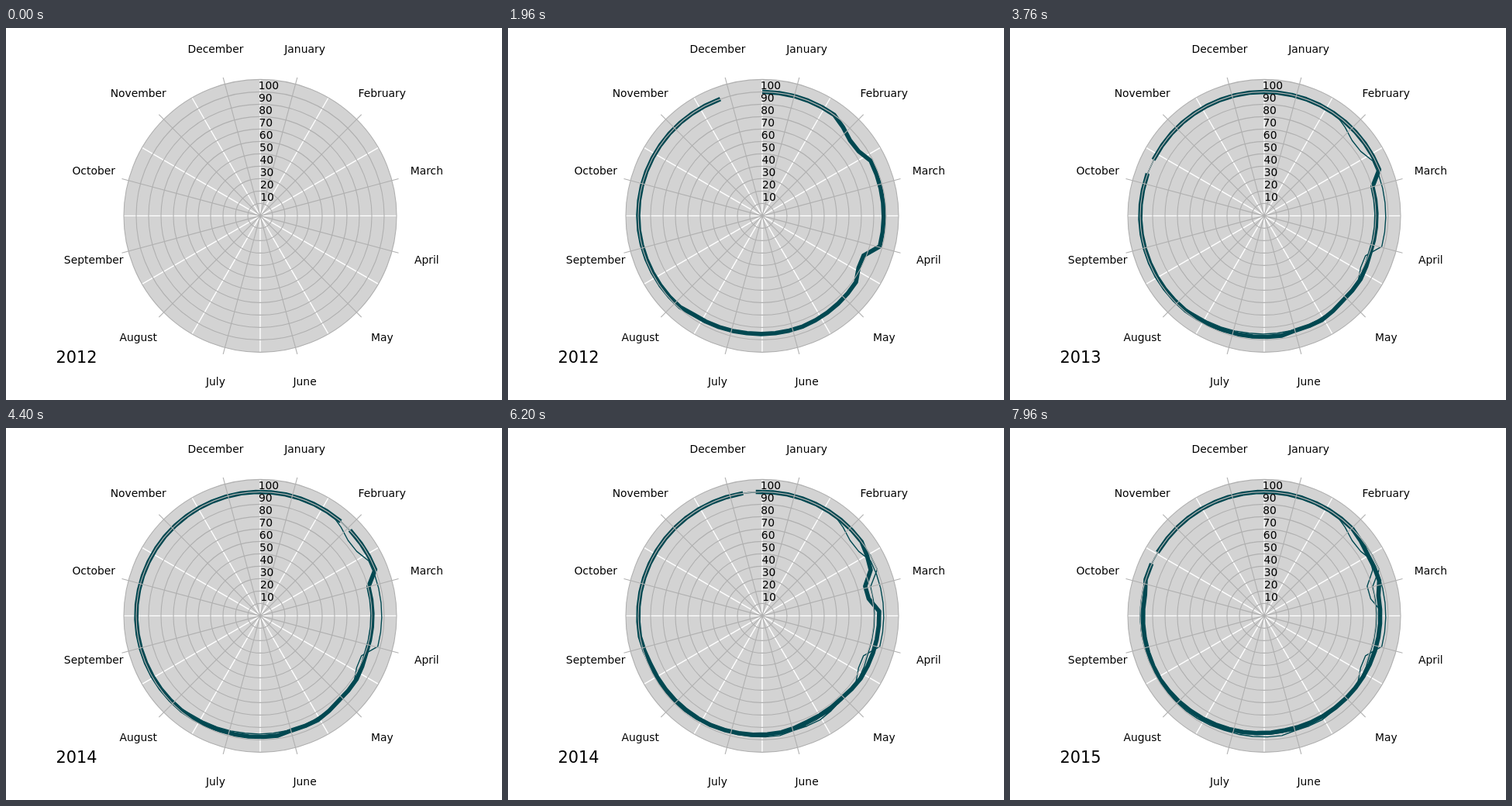
Recreate the animation shown at these times as an HTML page with a canvas. Size 640 px wide and 480 px high, loop 8 s.

```html
<!DOCTYPE html>
<html lang="en">
<head>
<meta charset="utf-8">
<title>Weekly values by year</title>
<style>
  html, body { margin: 0; width: 100%; height: 100%; overflow: hidden; background: #fff; }
  canvas { display: block; }
</style>
</head>
<body>
<canvas id="stage" width="640" height="480"></canvas>
<script>
const ctx = document.getElementById('stage').getContext('2d');
const CX = 328, CY = 242.4, UNIT = 1.6, POINT = 100 / 72;
const WEEKS = 200, STEP = 40, WINDOW = 51;
const GRID = '#b0b0b0', INK = '#004851';
const MONTHS = ['January', 'February', 'March', 'April', 'May', 'June', 'July',
  'August', 'September', 'October', 'November', 'December'];

// Turning points [week, value]; the value runs straight between them.
const turns = [
  [0, 100], [5, 100], [7, 93.4], [8, 93.6], [9, 98.1], [15, 98], [16, 87.8], [17, 88.3],
  [18, 92.6], [23, 95], [27, 95.4], [31, 97], [32, 99], [38, 100],
  [62, 100], [63, 90.5], [68, 90.6], [70, 93], [72, 93.2], [74, 96], [76, 95.8],
  [77, 97.6], [81, 97.8], [84, 99.2], [91, 100],
  [112, 100], [114, 95], [115, 86.4], [116, 87], [117, 94.4], [122, 94.1], [124, 92.3],
  [127, 92.8], [129, 95.2], [134, 97.4], [140, 98.1], [142, 100],
  [163, 100], [165, 97], [167, 97], [168, 93.6], [181, 93.8], [191, 98.3], [197, 97.6],
  [198, 100], [WEEKS, 100]
];

function valueAt(week) {
  const next = turns.findIndex(([w]) => w > week);
  const [w0, v0] = turns[next - 1], [w1, v1] = turns[next];
  return v0 + (v1 - v0) * (week - w0) / (w1 - w0);
}

// Clockwise angle in degrees from the top.
function polar(degrees, value) {
  const a = degrees * Math.PI / 180, r = value * UNIT;
  return [CX + r * Math.sin(a), CY - r * Math.cos(a)];
}

const dateOf = week => Date.UTC(2012, 0, 1 + 7 * week);
const yearOf = week => new Date(dateOf(week)).getUTCFullYear();

const points = Array.from({ length: WEEKS }, (_, week) => {
  const dayOfYear = (dateOf(week) - Date.UTC(yearOf(week), 0, 0)) / 864e5;
  return polar(dayOfYear / 365 * 360, valueAt(week));
});

function strokePath(path, color, width) {
  ctx.beginPath();
  path.forEach(p => ctx.lineTo(...p));
  ctx.strokeStyle = color;
  ctx.lineWidth = width * POINT;
  ctx.stroke();
}

function circle(value) {
  ctx.beginPath();
  ctx.arc(CX, CY, value * UNIT, 0, 2 * Math.PI);
}

function spokes(offset, value, color, width) {
  for (let m = 0; m < 12; m++) strokePath([[CX, CY], polar(offset + 30 * m, value)], color, width);
}

function text(string, x, y, size, align) {
  ctx.font = `${size * POINT}px "DejaVu Sans", sans-serif`;
  ctx.textAlign = align;
  ctx.fillText(string, x, Math.round(y));
}

function drawDisc() {
  circle(110);
  ctx.fillStyle = '#d3d3d3';
  ctx.fill();
  ctx.lineCap = 'butt';
  spokes(0, 110, '#fff', 1);
}

function drawGrid() {
  ctx.lineCap = 'butt';
  spokes(15, 115.5, GRID, 0.8);
  for (let v = 10; v <= 110; v += 10) {
    circle(v);
    ctx.stroke();
  }
}

function drawLabels(year) {
  ctx.fillStyle = '#000';
  MONTHS.forEach((name, m) => {
    const [x, y] = polar(15 + 30 * m, 139);
    text(name, x, y + 4, 10, 'center');
  });
  for (let v = 10; v <= 100; v += 10) {
    const [x, y] = polar(-1, v);
    text(v, x + 0.5, y - 3, 10, 'left');
  }
  text(year, 64.6, 432, 15, 'left');
}

function draw(now) {
  const week = Math.floor(now / STEP) % WEEKS;
  ctx.fillStyle = '#fff';
  ctx.fillRect(0, 0, 640, 480);
  drawDisc();
  if (week > 0) {
    ctx.lineCap = 'square';
    ctx.lineJoin = 'round';
    strokePath(points.slice(0, week + 1), INK, 1);
    strokePath(points.slice(Math.max(0, week - WINDOW), week + 1), INK, 4);
  }
  drawGrid();
  drawLabels(yearOf(week));
}

const start = performance.now();
function tick() {
  draw(performance.now() - start);
  requestAnimationFrame(tick);
}
tick();
</script>
</body>
</html>
```
